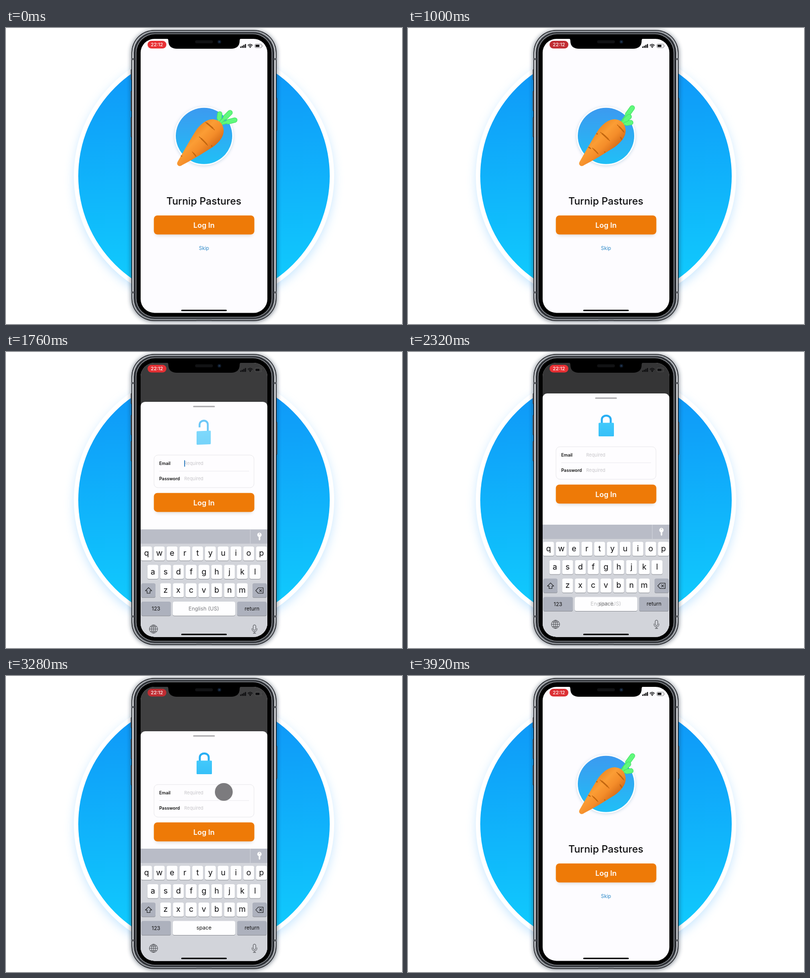
These frames come from a looping animation (800 by 600 pixels, 3960 ms). An HTML page:

```html
<!DOCTYPE html>
<html lang="en">
<head>
<meta charset="utf-8">
<title>Login sheet</title>
<style>
html, body { margin: 0; width: 100%; height: 100%; overflow: hidden; background: #fff; }
svg { display: block; width: 800px; height: 600px; }
text { font-family: Inter, sans-serif; }
.mid { text-anchor: middle; }
</style>
</head>
<body>
<svg viewBox="0 0 800 600">
  <defs>
    <linearGradient id="sky" x1="0" y1="0" x2="0" y2="1">
      <stop offset="0" stop-color="#0f94f8"/><stop offset=".92" stop-color="#10cafd"/>
    </linearGradient>
    <linearGradient id="badge" x1="0" y1="0" x2="0" y2="1">
      <stop offset="0" stop-color="#3c9af0"/><stop offset="1" stop-color="#20bff6"/>
    </linearGradient>
    <linearGradient id="peel" gradientUnits="userSpaceOnUse" x1="0" y1="-25" x2="0" y2="25">
      <stop offset="0" stop-color="#ef8d26"/><stop offset=".3" stop-color="#fb9d35"/>
      <stop offset=".65" stop-color="#f48d2a"/><stop offset="1" stop-color="#d9701a"/>
    </linearGradient>
    <linearGradient id="steel" x1="0" y1="0" x2="0" y2="1">
      <stop offset="0" stop-color="#9a9ea4"/><stop offset=".1" stop-color="#d9dce0"/>
      <stop offset=".9" stop-color="#c9ccd1"/><stop offset="1" stop-color="#8a8e94"/>
    </linearGradient>
    <linearGradient id="lockFill" x1="0" y1="0" x2="0" y2="1">
      <stop offset="0" stop-color="#43c9fb"/><stop offset="1" stop-color="#36c0f8"/>
    </linearGradient>
    <filter id="blur" x="-20%" y="-20%" width="140%" height="140%"><feGaussianBlur stdDeviation="10"/></filter>
    <filter id="halo" x="-20%" y="-20%" width="140%" height="140%"><feGaussianBlur stdDeviation="5"/></filter>
    <filter id="soft" x="-20%" y="-20%" width="140%" height="160%"><feGaussianBlur stdDeviation="3"/></filter>
    <clipPath id="screen"><rect x="272" y="22" width="256" height="555.5" rx="28"/></clipPath>
  </defs>

  <circle cx="400" cy="307" r="262" fill="#a9d9ff" opacity=".65" filter="url(#blur)"/>
  <circle cx="400" cy="300" r="263" fill="#fff"/>
  <circle cx="400" cy="300" r="254" fill="url(#sky)"/>

  <rect x="253" y="5" width="294" height="590" rx="46" fill="#1c2c3e" opacity=".6" filter="url(#halo)"/>
  <g fill="#8b8f96" stroke="#2c2f34" stroke-width=".8">
    <rect x="252.4" y="84" width="4" height="21" rx="1"/><rect x="252.4" y="128" width="4" height="40" rx="1"/>
    <rect x="252.4" y="181" width="4" height="40" rx="1"/><rect x="543.6" y="142" width="4" height="66" rx="1"/>
  </g>
  <rect x="253.5" y="4" width="293" height="590" rx="46" fill="#202226"/>
  <rect x="255" y="5.5" width="290" height="587" rx="44.5" fill="url(#steel)"/>
  <rect x="258" y="8.2" width="284" height="581.6" rx="42" fill="#2b2e33"/>
  <rect x="261.8" y="11" width="276.4" height="576" rx="39" fill="#83868c"/>
  <rect x="263.6" y="12.6" width="272.8" height="572.8" rx="37.5" fill="#000"/>
  <g fill="#5a5d62">
    <rect x="254" y="61" width="5" height="4"/><rect x="541" y="61" width="5" height="4"/>
    <rect x="254" y="534" width="5" height="4"/><rect x="541" y="534" width="5" height="4"/>
  </g>
  <rect x="384" y="591.5" width="32" height="2" rx="1" fill="#55585d"/>

  <g clip-path="url(#screen)">
    <rect x="272" y="22" width="256" height="556" fill="#fdfcff"/>
    <circle cx="400" cy="220" r="59" fill="#5b8fb5" opacity=".35" filter="url(#soft)"/>
    <circle cx="400" cy="218.8" r="59.5" fill="#fff"/>
    <circle cx="400" cy="218.8" r="57" fill="url(#badge)"/>
    <g id="carrot">
      <g id="leaves" stroke-linecap="round" fill="none"></g>
      <path d="M-1 0C-1-4 2-5 6-6C28-12 50-18 72-23C90-27 108-24 116-14C123-5 123 5 116 14C108 25 92 27 74 24C52 19 28 13 6 6C2 5-1 4-1 0Z" fill="url(#peel)"/>
      <g id="marks" stroke="#c2660f" stroke-linecap="round" fill="none"></g>
    </g>
    <text class="mid" x="399.7" y="358" font-size="20.2" font-weight="550" fill="#0b0b0d">Turnip Pastures</text>
    <g id="homeButton"></g>
    <text class="mid" x="400" y="449.5" font-size="10" fill="#2f8ac8">Skip</text>
    <rect id="dim" x="272" y="22" width="256" height="556" fill="#000"/>

    <g id="sheet">
      <rect x="272" y="84" width="256" height="520" rx="9" fill="#fefdff"/>
      <rect x="378" y="92" width="44" height="3" rx="1.5" fill="#b3b2b5"/>
      <g id="lock">
        <path id="shackle" fill="none" stroke="#27aef4" stroke-width="4"/>
        <rect x="385" y="143.5" width="31" height="27.5" rx="1.5" fill="url(#lockFill)"/>
      </g>
      <rect x="299" y="192" width="202" height="66" rx="8" fill="#fefdff" stroke="#e8e7eb"/>
      <path d="M309.5 224.5H491" stroke="#ebeaee"/>
      <g font-size="8.8" font-weight="600" fill="#111">
        <text x="309.5" y="212">Email</text><text x="309.5" y="243">Password</text>
      </g>
      <g font-size="9.2" fill="#c7c6ca">
        <text x="360" y="212">Required</text><text x="360" y="243">Required</text>
      </g>
      <rect id="caret" x="360" y="202.5" width="1.6" height="13" fill="#1f74bd"/>
      <g id="sheetButton"></g>
    </g>

    <g id="keyboard">
      <g id="toolbar">
        <rect x="272" y="350" width="256" height="30" fill="#b9bcc7"/>
        <path d="M493.5 350V379" stroke="#d0d2da"/>
        <g id="keyIcon" fill="#fff">
          <circle cx="512" cy="361" r="4.4"/><path d="M510.6 364h3v7l-1.5 1.7l-1.5-1.7z"/>
          <circle cx="512" cy="359.3" r="1.1" fill="#b9bcc7"/>
        </g>
      </g>
      <rect x="272" y="379" width="256" height="200" fill="#d2d4da"/>
      <g id="keys"></g>
      <g fill="none" stroke="#1b1c1e" stroke-width="1.1" stroke-linejoin="round">
        <path d="M288 468L294.5 474.5H291V479.5H285V474.5H281.5Z"/>
        <path d="M504.5 474L509.5 468.5H519.5V479.5H509.5ZM511.8 471.5l5 5M516.8 471.5l-5 5"/>
      </g>
      <g class="mid" font-size="10.6" fill="#111">
        <text x="303" y="514.6">123</text><text x="497" y="514.3">return</text>
        <text id="space" x="400" y="514.3">space</text>
        <text id="lang" x="399.6" y="514.3" fill="#77787c">English (US)</text>
      </g>
      <g fill="none" stroke="#4c4e53" stroke-width="1">
        <circle cx="298" cy="552" r="8.3"/><ellipse cx="298" cy="552" rx="4" ry="8.3"/>
        <path d="M298 543.7V560.3M289.7 552H306.3M291.5 547.5H304.5M291.5 556.5H304.5"/>
        <rect x="499.3" y="543.5" width="5.4" height="11" rx="2.7"/>
        <path d="M497 550.5V552.5C497 559 507 559 507 552.5V550.5M502 557.5V560.5M499 560.5H505"/>
      </g>
    </g>
    <circle id="touch" cx="440" r="18" fill="#7c7b7e"/>

    <path d="M322 21C327 21 328 23 328 26C328 37 335 42 345 42H455C465 42 472 37 472 26C472 23 473 21 478 21Z" fill="#000"/>
    <rect x="382" y="25" width="36" height="6" rx="3" fill="#111214"/>
    <circle cx="431" cy="28" r="3.6" fill="#101b2b"/><circle cx="431" cy="28" r="1.3" fill="#274260"/>
    <rect id="pill" x="286" y="26" width="38" height="15.5" rx="7.75"/>
    <text class="mid" x="304.8" y="37.2" font-size="9.6" font-weight="500" fill="#fff">22:12</text>
    <g fill="#0c0c0e">
      <rect x="473" y="37.5" width="2.3" height="2.7" rx=".5"/><rect x="476.2" y="36" width="2.3" height="4.2" rx=".5"/>
      <rect x="479.4" y="34.3" width="2.3" height="5.9" rx=".5"/><rect x="482.6" y="32.5" width="2.3" height="7.7" rx=".5"/>
      <rect x="504.2" y="34" width="7.8" height="4.6" rx="1"/>
      <path d="M518 35v2.8q1.2-1.4 0-2.8z"/>
    </g>
    <rect x="502.8" y="32.6" width="14" height="7.4" rx="2" fill="none" stroke="#555" stroke-width=".7"/>
    <path d="M488.6 35.4Q493.3 30.7 498 35.4M490.4 37.3Q493.3 34.5 496.2 37.3" fill="none" stroke="#0c0c0e" stroke-width="1.5"/>
    <circle cx="493.3" cy="39" r="1.2"/>
    <rect x="354" y="571" width="92" height="3" rx="1.5" fill="#000"/>
  </g>
</svg>
<script>
const LOOP = 3960, SPIN = 1470, BOB = 980, TAU = Math.PI * 2, RAD = Math.PI / 180;
const SHEET_H = 494, KEYS_H = 228;
const $ = id => document.getElementById(id);
const set = (id, attrs) => { for (const k in attrs) $(id).setAttribute(k, attrs[k]); };
const clamp = x => Math.min(1, Math.max(0, x));
const ramp = (t, from, to) => clamp((t - from) / (to - from));
const smooth = x => x * x * (3 - 2 * x);
const spring = t => t <= 0 ? 0 : 1 - (1 + .012 * t) * Math.exp(-.012 * t);
const mix = (a, b, x) => a.map((v, i) => Math.round(v + (b[i] - v) * x));

function button(y) {
  return `<rect x="301" y="${y + 4}" width="198" height="37" rx="7" fill="#8a7a68" opacity=".25" filter="url(#soft)"/>
    <rect x="298.7" y="${y}" width="203" height="38.5" rx="7" fill="#ee7a07"/>
    <text class="mid" x="400" y="${y + 25}" font-size="14.6" font-weight="600" fill="#fff">Log In</text>`;
}

function key(x, y, w, fill = '#fefeff') {
  return `<rect x="${x}" y="${y + 1}" width="${w}" height="28.5" rx="3.6" fill="#8d9096"/>
    <rect x="${x}" y="${y}" width="${w}" height="28.5" rx="3.6" fill="${fill}"/>`;
}

function buildKeys() {
  const rows = [['qwertyuiop', 283.9, 384.8], ['asdfghjkl', 296.7, 422], ['zxcvbnm', 322.4, 459.3]];
  let out = '';
  for (const [chars, x0, y] of rows) {
    [...chars].forEach((c, i) => {
      const x = x0 + i * 25.8;
      out += key(x - 11, y, 22) +
        `<text class="mid" x="${x}" y="${y + 19}" font-size="16" fill="#0c0c0e">${c}</text>`;
    });
  }
  const grey = '#adb1bd';
  out += key(273.5, 459.3, 28.5, grey) + key(498, 459.3, 28.7, grey);
  out += key(273.5, 496.5, 59.5, grey) + key(337, 496.5, 126) + key(467, 496.5, 59.5, grey);
  $('keys').innerHTML = out;
}

// leaf: start angle, sideways reach, length, foreshortening
const leafSet = [[120, 23, 31, 4], [0, 8, 42, 5], [240, 17, 19, 3]];
// mark: distance from the tip, start angle
const markSet = [[101, -31], [97, -160], [110, 140], [70, 8], [76, 100], [55, -134],
  [39, 43], [42, 125], [19, -92]];
const girth = s => s < 80 ? 4.5 + s * .25 : 25 - Math.max(0, s - 98) ** 2 / 30;

function drawLeaves(turn) {
  const line = (a, b, w, color) => `<path d="M${a}L${b}" stroke="${color}" stroke-width="${w}"/>`;
  $('leaves').innerHTML = leafSet
    .map(([deg, side, len, dip]) => ({ a: turn + deg * RAD, side, len, dip }))
    .sort((p, q) => Math.cos(p.a) - Math.cos(q.a))
    .map(({ a, side, len, dip }) => {
      const x = len - dip * Math.cos(a) - 4, y = side * Math.sin(a) * .88;
      const at = k => `${116 + x * k} ${y * k}`;
      return line(at(0), at(.6), 6.5, '#45e066') + line(at(.6), at(1), 10.5, '#45e066') +
        line(at(0), at(.6), 4.5, '#5df67a') + line(at(.6), at(1), 8.5, '#60f97c');
    }).join('');
}

function drawMarks(turn) {
  let out = '';
  for (const [s, deg] of markSet) {
    const r = girth(s), pts = [];
    for (let u = -36; u <= 36; u += 4) {
      const a = turn + (deg + u) * RAD, c = Math.cos(a);
      if (c > .15) pts.push(`${(s - 2 + r * .12 * c).toFixed(2)} ${(r * .95 * Math.sin(a)).toFixed(2)}`);
    }
    if (pts.length > 1) {
      const wide = pts.slice(Math.floor(pts.length * .25), Math.ceil(pts.length * .8));
      out += `<path d="M${pts.join('L')}" stroke-width="1.4"/>`;
      if (wide.length > 1) out += `<path d="M${wide.join('L')}" stroke-width="${1.4 + r * .06}"/>`;
    }
  }
  $('marks').innerHTML = out;
}

function sheetOffset(t) {
  if (t < 3000) return SHEET_H * (1 - spring(t - 1327));
  if (t <= 3280) return 28 * ramp(t, 3080, 3280) ** 2;
  return 28 + 480 * smooth(ramp(t, 3280, 3440));
}

function draw(t) {
  const turn = t / SPIN * TAU;
  const bob = -4 * (1 - Math.cos(t / BOB * TAU));
  set('carrot', { transform: `translate(348 ${277.6 + bob}) rotate(-45.4)` });
  drawLeaves(turn);
  drawMarks(turn);

  const glow = clamp(.5 - .9 * Math.cos((t - 1040) / 2240 * TAU));
  set('pill', { fill: `rgb(${mix([192, 44, 50], [232, 48, 52], glow)})` });

  const y = sheetOffset(t);
  const dim = t > 3280 ? .745 * (1 - ramp(t, 3280, 3468)) : .79 * (1 - y / SHEET_H);
  set('dim', { opacity: dim });
  set('sheet', { transform: `translate(0 ${y})` });

  const close = smooth(ramp(t, 1880, 2120)), swing = smooth(ramp(t, 1480, 1960));
  set('lock', {
    opacity: .08 + .92 * ramp(t, 1500, 1900),
    transform: `translate(385 146) skewY(${-6 * (1 - swing)}) scale(${.8 + .2 * swing} 1) translate(-385 -146)`
  });
  const top = 129 - 6 * (1 - close), left = 145 - 9 * (1 - close);
  set('shackle', { d: `M391.5 ${left}V${top + 8}C391.5 ${top - 2.7} 409.5 ${top - 2.7} 409.5 ${top + 8}V145` });
  const blink = (t - 1480) % 1060 < 560;
  set('caret', { opacity: t < 3080 && blink ? 1 : 0 });

  const keysY = t < 3300
    ? KEYS_H * (1 - spring(t - 1347))
    : KEYS_H * Math.sin(ramp(t, 3300, 3600) * Math.PI / 2);
  set('keyboard', { transform: `translate(0 ${keysY})`, display: keysY > 227.9 ? 'none' : 'inline' });
  set('toolbar', { opacity: t < 3300 ? .88 + .12 * ramp(t, 1500, 1800) : 1 - ramp(t, 3320, 3420) });
  set('keyIcon', { opacity: ramp(t, 1560, 1760) });
  const swap = ramp(t, 2200, 2420);
  set('space', { opacity: swap });
  set('lang', { opacity: 1 - swap });

  set('touch', { cy: 207 + y, opacity: ramp(t, 3020, 3100) * (1 - ramp(t, 3320, 3400)) });
}

$('homeButton').innerHTML = button(380);
$('sheetButton').innerHTML = button(268.7);
buildKeys();

const start = performance.now();
function tick() {
  const t = (performance.now() - start) % LOOP;
  draw(Math.floor(t / 40) * 40);
  requestAnimationFrame(tick);
}
tick();
</script>
</body>
</html>
```
